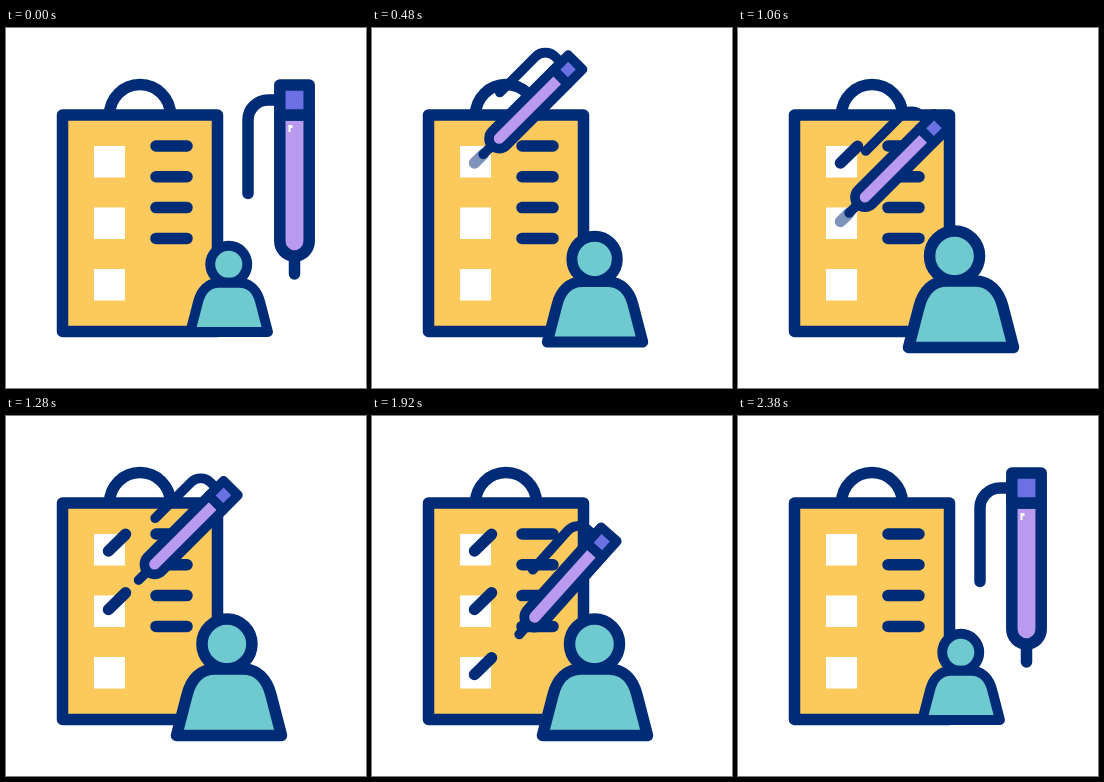
Recreate the animation shown at these times as an HTML page. Size 360 by 360 pixels, loop 2400 ms.

```html
<!DOCTYPE html>
<html lang="en">
<head>
<meta charset="utf-8">
<title>Checklist</title>
<style>
  html, body { margin: 0; width: 100%; height: 100%; overflow: hidden; background: #fff; }
  svg { display: block; width: 100%; height: 100%; }
  g { fill: none; stroke: #002c77; stroke-width: 11.5; stroke-linecap: round; stroke-linejoin: round; }
  .box { fill: #fff; stroke: none; }
  #person { fill: #6ecace; }
</style>
</head>
<body>
<svg viewBox="0 0 360 360">
  <g id="board">
    <path d="M103.5 87a30.5 30.5 0 0 1 61 0"/>
    <path fill="#fcc95c" d="M56.5 87h155v216.5h-155z"/>
  </g>
  <!-- The pen's origin is the tip of its nib. -->
  <g id="pen">
    <path d="M-15-174h-11.5a20 20 0 0 0-20 20v73.5"/>
    <path d="M0-13V0"/>
    <path fill="#b99aef" d="M-14.700-159v126a14.700 15 0 0 0 29.400 0v-126z"/>
    <path fill="#6b70e2" d="M-14.700-189h29.400v30h-29.400z"/>
    <path id="shine" fill="#fff" stroke="none" d="M-6-149h4v3h-2v4h-2z"/>
  </g>
  <!-- The person's origin is the point it grows from. -->
  <g id="person">
    <circle id="head" cy="-32" r="25"/>
    <path d="M-53 59.500L-42.500 19C-38.500 3-28.500-7-14.500-7h28C27.500-7 37.500 3 41.500 19L52 59.500z"/>
  </g>
</svg>
<script>
const LOOP = 2400;
const WEIGHT = 11.5;
const LEAVE = 120;
const RETURN = 2340;
const REST = { x: 288.5, y: 246 };
const byId = id => document.getElementById(id);

function addPath(d, className) {
  const path = document.createElementNS('http://www.w3.org/2000/svg', 'path');
  path.setAttribute('d', d);
  path.setAttribute('class', className);
  return byId('board').appendChild(path);
}

for (let i = 0; i < 3; i++) addPath(`M88 ${118 + 61.5 * i}h31v31.5h-31z`, 'box');
for (let i = 0; i < 4; i++) addPath(`M150 ${118 + 30.8 * i}h31`, 'line');

// lift: how far the pen swings up and right after a check mark.
const checks = [
  { y: 135, from: 400, to: 560, lift: 12 },
  { y: 193.5, from: 920, to: 1200, lift: 86 },
  { y: 258.5, from: 1656, to: 1780, lift: 88 }
].map(c => ({
  ...c,
  start: { x: 102.5, y: c.y },
  end: { x: 119.5, y: c.y - 16.7 },
  path: addPath(`M102.5 ${c.y}l17-16.7`, 'check')
}));
for (const { path } of checks) {
  path.setAttribute('pathLength', 1);
  path.setAttribute('stroke-dasharray', '1 2');
}

const mix = (a, b, u) => a + (b - a) * u;
const between = (p, q, u) => ({ x: mix(p.x, q.x, u), y: mix(p.y, q.y, u) });

function ease(t, start, end) {
  const u = Math.min(1, Math.max(0, (t - start) / (end - start)));
  return u * u * (3 - 2 * u);
}

function arc(p, q, dx, dy, u) {
  const bend = { x: p.x + dx, y: p.y + dy };
  return between(between(p, bend, u), between(bend, q, u), u);
}

function nibAt(t) {
  let here = REST, left = LEAVE, dx = -90, dy = -86;
  for (const c of checks) {
    if (t < c.from) return arc(here, c.start, dx, dy, ease(t, left, c.from));
    if (t < c.to) return between(c.start, c.end, ease(t, c.from, c.to));
    [here, left, dx, dy] = [c.end, c.to, c.lift, -c.lift];
  }
  return arc(here, REST, dx, dy, ease(t, left, RETURN));
}

// Line weight shrinks more slowly than the shape itself.
function place(group, x, y, angle, scale) {
  group.setAttribute('transform', `translate(${x} ${y}) rotate(${angle}) scale(${scale})`);
  group.style.strokeWidth = WEIGHT / Math.sqrt(scale);
}

function draw(t) {
  const nib = nibAt(t);
  const tilt = ease(t, LEAVE, 400) - ease(t, 1840, RETURN);
  place(byId('pen'), nib.x, nib.y, 45 * tilt, mix(1, 0.69, tilt));
  byId('shine').style.opacity = 1 - tilt;

  for (const { path, from, to } of checks) {
    const drawn = ease(t, from, to);
    path.style.strokeDashoffset = 1 - drawn;
    path.style.opacity = drawn * (1 - ease(t, 2040, 2240));
  }

  const grow = ease(t, LEAVE, 720) - ease(t, 1930, RETURN);
  place(byId('person'), 223.5, 260, 0, mix(0.74, 1, grow));
  const swing = Math.min(1, Math.max(0, (t - 740) / 1180));
  byId('head').setAttribute('cx', -1 - 6 * Math.sin(2 * Math.PI * swing));
}

function tick() {
  draw(performance.now() % LOOP);
  requestAnimationFrame(tick);
}
tick();
</script>
</body>
</html>
```
